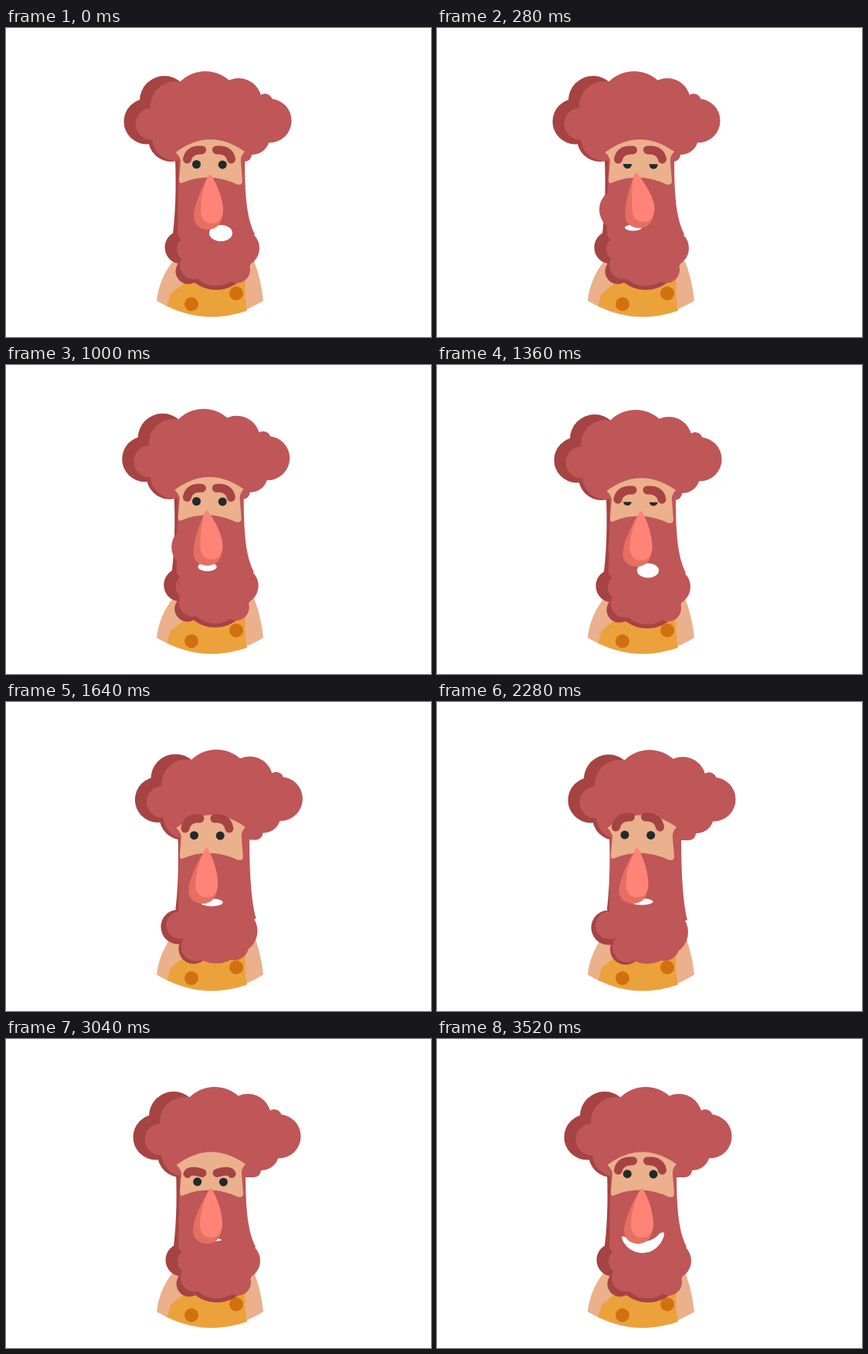
An HTML page with a canvas for the animation above (4.64 s loop, 550x400 px).

```html
<!DOCTYPE html>
<html lang="en">
<head>
<meta charset="utf-8">
<title>Talking bearded man</title>
<style>
  html, body { margin: 0; width: 100%; height: 100%; overflow: hidden; background: #fff; }
  canvas { display: block; width: 550px; height: 400px; }
</style>
</head>
<body>
<canvas id="stage" width="550" height="400"></canvas>
<script>
const ctx = document.getElementById('stage').getContext('2d');
const LOOP = 4640, STEP = 40;
const RED = '#bf5658', DARK = '#a64343', SKIN = '#ebb08c', WHITE = '#fff';

const TORSO = new Path2D('M195 353Q198 325 216 302H321Q330 325 333 353Q265 395 195 353Z');
const SHIRT = new Path2D('M208.5 360L213 344L232 329L310 320Q308 350 312 366Q260 384 208.5 360Z');
const FACE = new Path2D('M219.5 161Q264 128 309 160Q303 166 304 174L306 198' +
  'Q306 204 299 202.5Q264 186 229 200Q224 203 224 196L226 172Q225 166 219.5 161Z');
const SMILE = new Path2D('M239 257C240 254 243 256 246 258C256 264 276 265 286 254' +
  'C290 249 295 249 294 254C290 268 279 277 266 277C253 277 242 268 239 257Z');

// Hair lobes: x, y, radius.
const HAIR_BACK = [[205, 94, 32], [214, 143, 30], [182, 121, 29.5]];
const HAIR = [[219, 101, 32], [258, 102, 46], [301, 95, 30], [335, 95, 10], [341, 120, 28.5],
  [319, 142, 22], [309, 164, 9], [219, 142, 30], [188, 124, 20.5]];

// Beard lobes: upright, then leaning.
const SHADE = [
  [[227, 284, 21.5], [221, 290, 22.5]],
  [[236, 315, 16.5], [243, 318, 20]],
  [[272, 293, 46], [271, 288, 46]]];
const BEARD = [
  [[304, 285, 24], [294, 296, 30]],
  [[299, 313, 17], [293, 313, 20]],
  [[272, 298, 36], [271, 298, 39]],
  [[243, 307, 18], [245, 316, 19]],
  [[238, 286, 17], [222, 287, 18]]];

// brow: shift, outer y, inner y, lift. nose: tip x, tip y, base x, base y.
const rest = {
  hair: [0, 0], head: [0, 0], puff: [0], lean: [0], smile: [0],
  eye: [246.5, 176.5], brow: [0, 170, 158, 1],
  nose: [264, 189, 266.5, 253], mouth: [278, 265.5, 15, 10.5]
};
const puff = { ...rest, hair: [-3, 0], head: [-2, 0], puff: [1],
  nose: [258, 187, 267, 251], mouth: [254, 258.5, 11, 4] };
const sway = { ...rest, brow: [-.5, 174, 162, 1],
  nose: [264, 189, 264, 253], mouth: [271, 262, 15, 7.5] };
const drop = { ...sway, hair: [-1, 2], head: [0, 2], mouth: [273, 266, 14, 9.5] };
const lean = { ...rest, hair: [17, 6], head: [1, 2], lean: [1],
  eye: [243, 172], brow: [-3, 162, 149, 1],
  nose: [259, 189, 259, 253], mouth: [265, 258.5, 14.5, 4.2] };
const frown = { ...rest, hair: [12, 6], head: [1, 2],
  eye: [247.7, 184.8], brow: [.5, 174.5, 173.5, 5],
  nose: [265, 193, 265.5, 257], mouth: [269, 260, 10, 1.8] };
const grin = { ...frown, smile: [1], eye: [246.3, 174.7],
  brow: rest.brow, mouth: [269, 260, 4, 0] };

const SCENE = [[0, rest], [280, puff], [480, drop], [720, sway], [920, puff], [1120, drop],
  [1400, drop], [1720, lean], [2800, lean], [3040, frown], [3280, frown], [3520, grin], [LOOP, grin]];
const BLINKS = [368, 1434, 2135];

const mix = (a, b, k) => a.map((v, i) => v + (b[i] - v) * k);

function poseAt(t) {
  const i = SCENE.findIndex(([time]) => time > t);
  const [t0, a] = SCENE[i - 1], [t1, b] = SCENE[i];
  const k = (1 - Math.cos(Math.PI * (t - t0) / (t1 - t0))) / 2;
  return Object.fromEntries(Object.keys(a).map(key => [key, mix(a[key], b[key], k)]));
}

function lidAt(t) {
  const gap = Math.min(...BLINKS.map(b => Math.abs(t - b)));
  return Math.min(1, Math.max(0, 1.25 - gap / 110));
}

function fill(path, color) {
  ctx.fillStyle = color;
  ctx.fill(path);
}

function oval(x, y, rx, ry, color, from = 0, to = 2 * Math.PI) {
  const p = new Path2D();
  p.ellipse(x, y, rx, ry, 0, from, to);
  fill(p, color);
}

function lobes(list, color) {
  list.forEach(([x, y, r]) => oval(x, y, r, r, color));
  fill(new Path2D('M' + list.map(([x, y]) => x + ' ' + y).join('L') + 'Z'), color);
}

function shifted([dx, dy], paint) {
  ctx.save();
  ctx.translate(dx, dy);
  paint();
  ctx.restore();
}

function shade(k) {
  const x = 218 + 3 * k;
  fill(new Path2D(`M${x} 150Q${x + 4} 215 ${x - 2} 266L240 300L270 150Z`), DARK);
  lobes(SHADE.map(([a, b]) => mix(a, b, k)), DARK);
}

function beard(k, cheek) {
  const top = 309 + 6 * k, x = 322 + k, y = 267 + 13 * k;
  fill(new Path2D(`M224 150L222 268L238 290H300L${x} ${y}` +
    `C${x - 9 + 4 * k} ${y - 18} ${top} 225 ${top} 172V150Z`), RED);
  lobes(BEARD.map(([a, b]) => mix(a, b, k)), RED);
  oval(250 - 10 * cheek, 235, 28, 28, RED);
}

function eye(x, y, lid) {
  const cut = Math.asin(2 * lid - 1);
  if (lid < 1) oval(x, y, 5.5, 5.5, '#212b2b', cut, Math.PI - cut);
}

function brow(side, [dx, outer, inner, lift]) {
  ctx.save();
  ctx.translate(263 + dx, 0);
  ctx.scale(side, 1);
  ctx.lineWidth = 11;
  ctx.lineCap = 'round';
  ctx.strokeStyle = DARK;
  ctx.stroke(new Path2D(`M-28.5 ${outer}Q-26 ${inner - lift} -9.5 ${inner}`));
  ctx.restore();
}

function tear(tx, ty, x, w, b, color) {
  fill(new Path2D(`M${tx} ${ty}C${tx - 7} ${ty + 8} ${x - w} ${b - 33} ${x - w} ${b - 17}` +
    `C${x - w} ${b - 5} ${x - 8} ${b} ${x} ${b}S${x + w} ${b - 5} ${x + w} ${b - 17}` +
    `C${x + w} ${b - 33} ${tx + 7} ${ty + 8} ${tx} ${ty}Z`), color);
}

function draw(t) {
  const p = poseAt(t), lid = lidAt(t);

  ctx.fillStyle = WHITE;
  ctx.fillRect(0, 0, 550, 400);
  fill(TORSO, SKIN);
  fill(SHIRT, '#eba23a');
  oval(240, 357.5, 9, 9, '#d2700f');
  oval(298, 343.5, 9, 9, '#d2700f');

  shifted(p.head, () => shade(p.lean[0]));
  shifted(p.hair, () => {
    lobes(HAIR_BACK, DARK);
    lobes(HAIR, RED);
    ctx.fillRect(264, 150, 45, 23);
  });
  shifted(p.head, () => {
    beard(p.lean[0], p.puff[0]);
    fill(FACE, SKIN);
  });

  const [ex, ey] = p.eye;
  eye(ex, ey, lid);
  eye(ex + 33.7, ey + .4, lid);
  brow(1, p.brow);
  brow(-1, p.brow);

  oval(...p.mouth, WHITE);
  ctx.save();
  ctx.translate(267, 262);
  ctx.scale(p.smile[0], p.smile[0]);
  ctx.translate(-267, -262);
  if (p.smile[0]) fill(SMILE, WHITE);
  ctx.restore();

  const [tx, ty, x, b] = p.nose;
  tear(tx, ty, x - 5.5, 18, b + 8, '#e57062');
  tear(tx, ty, x, 14.5, b, '#ff8377');
}

const start = performance.now();
function tick() {
  const t = (performance.now() - start) % LOOP;
  draw(Math.floor(t / STEP) * STEP);
  requestAnimationFrame(tick);
}
tick();
</script>
</body>
</html>
```
